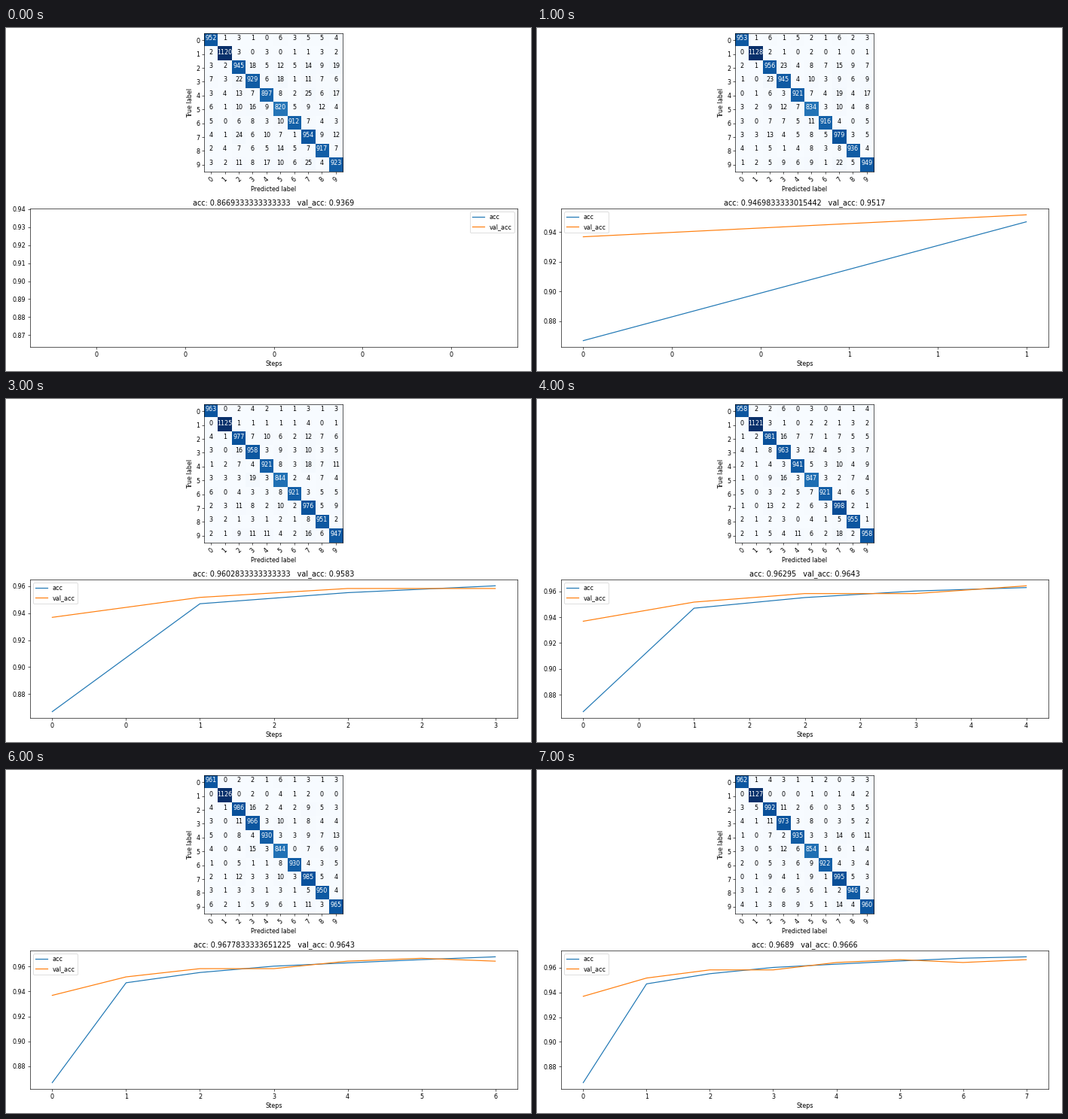
Write a matplotlib script that moves like this. It is 697 px wide and 456 px high and loops after 8 s.

```python
import numpy as np
import matplotlib.pyplot as plt
from matplotlib.animation import FuncAnimation

W, H, DPI = 697, 456, 57.6
EPOCHS = 8

ACC = ["0.8669333333333333", "0.9469833333015442", "0.9552166666666667",
       "0.9602833333333333", "0.96295", "0.9655166666666667",
       "0.9677833333651225", "0.9689"]
VAL = ["0.9369", "0.9517", "0.9583", "0.9583",
       "0.9643", "0.9666", "0.9643", "0.9666"]

# Samples per digit, how often each is misread, and how often it is guessed.
SAMPLES = np.array([980, 1135, 1032, 1010, 982, 892, 958, 1028, 974, 1009])
MISREAD = [24, 11, 62, 46, 48, 53, 36, 47, 38, 55]
GUESSED = [20, 13, 52, 50, 35, 50, 20, 60, 45, 45]
LOOKALIKES = [(2, 3), (3, 2), (3, 5), (5, 3), (4, 9), (4, 7),
              (6, 0), (6, 5), (7, 2), (9, 4), (9, 7)]

plt.rcParams["font.family"] = "DejaVu Sans"
# The tiny surplus keeps the pixel size from rounding down.
fig = plt.figure(figsize=((W + 1e-6) / DPI, (H + 1e-6) / DPI), dpi=DPI,
                 facecolor="white")


def add_axes(left, top, right, bottom):
    return fig.add_axes([left / W, 1 - bottom / H,
                         (right - left) / W, (bottom - top) / H])


grid_ax = add_axes(263, 7, 447, 191)
plot_ax = add_axes(32, 240, 679, 424)


def confusion(epoch):
    """Spread the wrong answers of one epoch over the digit pairs."""
    odds = np.outer(MISREAD, GUESSED).astype(float)
    np.fill_diagonal(odds, 0)
    for pair in LOOKALIKES:
        odds[pair] *= 2.5
    wrong = round((1 - float(VAL[epoch])) * SAMPLES.sum())
    rng = np.random.default_rng(epoch)
    m = rng.multinomial(wrong, odds.ravel() / odds.sum()).reshape(10, 10)
    return m + np.diag(SAMPLES - m.sum(axis=1))


def draw_matrix(ax, m):
    ax.clear()
    ax.imshow(m, cmap="Blues", interpolation="nearest", aspect="auto")
    ax.set_xticks(range(10), range(10), rotation=45)
    ax.set_yticks(range(10), range(10))
    for (row, col), n in np.ndenumerate(m):
        ax.text(col, row, str(n), ha="center",
                color="white" if n > m.max() / 2 else "black")
    ax.set_xlabel("Predicted label")
    ax.set_ylabel("True label")


def draw_history(ax, epoch):
    ax.clear()
    for name, values in (("acc", ACC), ("val_acc", VAL)):
        ax.plot([float(v) for v in values[:epoch + 1]], label=name)
    ax.xaxis.set_major_formatter(lambda x, pos: str(int(round(x))))
    ax.set_xlabel("Steps")
    ax.set_title(f"acc: {ACC[epoch]}   val_acc: {VAL[epoch]}")
    ax.legend(loc="upper left" if epoch else "upper right")


def draw(epoch):
    draw_matrix(grid_ax, confusion(epoch))
    draw_history(plot_ax, epoch)
    return []


anim = FuncAnimation(fig, draw, frames=EPOCHS, interval=1000,
                     init_func=lambda: draw(0), repeat=True, repeat_delay=0)
plt.show()
```
